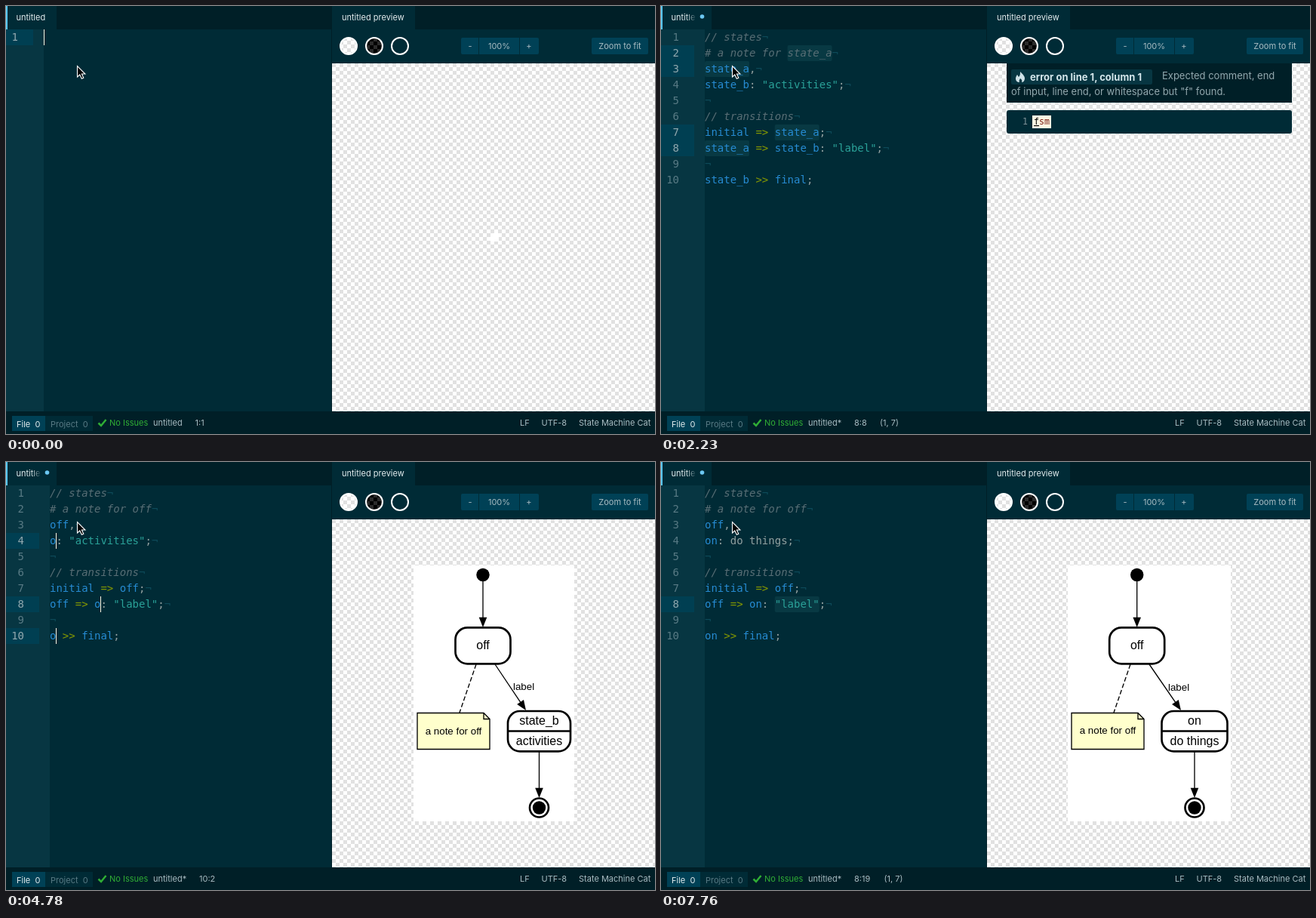
Animation, 860 px wide and 567 px high, one loop 8000 ms. Source, as an HTML page:

```html
<!DOCTYPE html>
<html lang="en">
<head>
<meta charset="utf-8">
<title>Editor with live preview</title>
<style>
  html, body { margin: 0; width: 860px; height: 567px; overflow: hidden; background: #002b36; }
  svg { display: block; }
  text { white-space: pre; font: 11px Inter, sans-serif; fill: #a9bcc2; }
  .code, .code text { font: 14px "DejaVu Sans Mono", monospace; fill: #93a1a1; }
  .code .comment { fill: #586e75; font-style: italic; }
  .code .id { fill: #268bd2; }
  .code .op { fill: #859900; }
  .code .str { fill: #2aa198; }
  .code .eol { fill: #0d4a59; }
  .code .num { fill: #587a84; text-anchor: end; }
  .code .on { fill: #93a9af; }
  .tab { fill: #e3ecee; }
  .mid { text-anchor: middle; }
  .popup { font: 12.6px "DejaVu Sans Mono", monospace; fill: #7fa3ae; }
  .match { font: bold 13.3px "DejaVu Sans Mono", monospace; fill: #d3e3e8; }
  .match tspan { fill: #fff; }
  .error { font-size: 13px; fill: #93a8ae; }
  .strong { font-weight: 700; fill: #d5e7ec; }
  .excerpt { font: 11.6px "DejaVu Sans Mono", monospace; fill: #7d9197; }
  .bad { fill: #7a1a10; }
  .bad tspan { fill: #000; text-decoration: underline; }
  .diagram { fill: none; stroke: #000; stroke-width: 1.33; }
  .diagram text { font: 16px "Liberation Sans", Arial, sans-serif; fill: #000; stroke: none; }
  .diagram .small { font-size: 13.33px; }
  .solid { fill: #000; stroke: none; }
  .thick { stroke-width: 2.67; }
</style>
</head>
<body>
<svg width="860" height="567">
  <defs>
    <pattern id="light" x="432" y="76" width="10" height="10" patternUnits="userSpaceOnUse">
      <path fill="#fff" d="M0 0h10v10H0z"/><path fill="#e1e1e1" d="M0 0h5v5H0zM5 5h5v5H5z"/>
    </pattern>
    <pattern id="dark" x="482" y="47" width="10" height="10" patternUnits="userSpaceOnUse">
      <path fill="#000" d="M0 0h10v10H0z"/><path fill="#2b2b2b" d="M0 0h5v5H0zM5 5h5v5H5z"/>
    </pattern>
    <linearGradient id="fade">
      <stop stop-color="#002b36" stop-opacity="0"/><stop offset="1" stop-color="#002b36"/>
    </linearGradient>
  </defs>

  <path fill="#002b36" d="M0 0h860v567H0z"/>
  <path fill="#001f27" d="M67 0h365v31H67zM542 0h318v31H542zM0 537h860v30H0zM431 31h1v506h-1z"/>
  <path fill="#5ac8fa" d="M0 0h2v31H0z"/>
  <text class="tab" x="445" y="19">untitled preview</text>

  <path fill="url(#light)" d="M432 76h428v461H432z"/>
  <g stroke="#fff" stroke-width="2">
    <circle cx="454" cy="53" r="11" fill="url(#light)"/>
    <circle cx="488" cy="53" r="11" fill="url(#dark)"/>
    <circle cx="522" cy="53" r="11" fill="none"/>
  </g>
  <g fill="#004156">
    <rect x="603" y="42" width="103" height="22" rx="2"/>
    <rect x="776" y="42" width="75" height="22" rx="2"/>
    <path d="M8 543h44v20H8z"/>
  </g>
  <path fill="#002b36" d="M626 42h1v22h-1zM680 42h1v22h-1zM52 543h63v20H52z"/>
  <g class="mid">
    <text x="615" y="57">-</text><text x="653.5" y="57">100%</text>
    <text x="693" y="57">+</text><text x="813.5" y="57">Zoom to fit</text>
  </g>

  <text class="tab" x="14" y="558">File  0</text>
  <text x="59" y="558" style="fill:#587a84">Project  0</text>
  <path d="M122.500 552.500l3.500 3.500 6.500-8" fill="none" stroke="#2fae35" stroke-width="2.500"/>
  <text x="137" y="556" style="fill:#2fae35">No Issues</text>
  <text x="681" y="556">LF</text><text x="709.500" y="556">UTF-8</text>
  <text x="759" y="556">State Machine Cat</text>

  <g id="view"></g>
  <path d="M94.500 79.500v14.500l3.300-3 2.500 5.300 2.500-1.100-2.400-5.200h4.500z" fill="#000" stroke="#fff" stroke-width="1.100"/>
</svg>
<script>
const LOOP = 8000, CHAR = 8.43, ROW = 21, TOP = 31;

// Preview geometry: page, state, note, second state, label, edges
const wide = { page: [525, 768], sx: 636, note: [530, 656], bx: 721.5, half: 41.5, label: 681, dash: [626, 602], edge: [656, 701], drop: 0 };
const slim = { page: [540, 753], sx: 632, note: [545, 641], bx: 706.5, half: 41.5, label: 672, dash: [623, 601], edge: [648, 689], drop: 0 };
const last = { page: [539, 755], sx: 630.7, note: [544, 640], bx: 707, half: 43.5, label: 672, dash: [622, 600], edge: [647, 689], drop: 1 };

// Each step changes part of the state from its time on
const steps = [
  [0, { typed: "", caret: true }],
  [300, { caret: false }],
  [740, { typed: "f", caret: true }],
  [890, { typed: "fs", popup: true }],
  [1190, { dirty: true, error: "f" }],
  [1330, { typed: "fsm" }],
  [1480, { error: "fs" }],
  [1630, { error: "fsm" }],
  [1930, { caret: false }],
  [2230, { expanded: true, popup: false, a: "state_a", b: "state_b", act: '"activities"', label: '"label"', focus: "a", selected: true }],
  [2680, { error: "", shown: ["state_a", "state_b", "activities", wide] }],
  [3580, { a: "of", selected: false, caret: true }],
  [3730, { a: "off" }],
  [4030, { shown: ["off", "state_b", "activities", slim] }],
  [4180, { focus: "b", selected: true }],
  [4780, { b: "o", selected: false }],
  [4930, { b: "on" }],
  [5230, { shown: ["off", "on", "activities", slim], focus: "act", selected: true }],
  [5830, { act: "d", selected: false }],
  [5980, { act: "do" }],
  ...["do ", "do th", "do thi", "do thin", "do thing", "do things"].map((act, i) => [6280 + 148 * i, { act }]),
  [7470, { caret: false, shown: ["off", "on", "do things", last] }],
  [7760, { focus: "label", selected: true }]
];

const text = (x, y, s, cls = "") => `<text x="${x}" y="${y}" class="${cls}">${s}</text>`;
const box = (x, y, w, h, fill, rx = 0) => `<rect x="${x}" y="${y}" width="${w}" height="${h}" fill="${fill}" rx="${rx}"/>`;

// Tokens are [text, class, slot]
function codeLines(s) {
  if (!s.expanded) return [[[s.typed, "id", "typed"]]];
  const a = [s.a, "id", "a"], b = [s.b, "id", "b"];
  const act = [s.act, s.act[0] == '"' ? "str" : "", "act"];
  const comment = t => [t, "comment"], op = t => [t, "op"];
  return [
    [comment("// states")],
    [comment("# a note for "), [s.a, "comment", "a"]],
    [a, [","]],
    [b, [": "], act, [";"]],
    [],
    [comment("// transitions")],
    [["initial", "id"], op(" => "), a, [";"]],
    [a, op(" => "), b, [": "], [s.label, "str", "label"], [";"]],
    [],
    [b, op(" >> "), ["final", "id"], [";"]]
  ];
}

function editor(s) {
  const left = s.expanded ? 58 : 50, focus = s.focus || "typed";
  const lines = codeLines(s);
  let out = box(0, TOP, left, 537 - TOP, "#073642"), marks = "", carets = "", pos, count = 0;
  lines.forEach((tokens, row) => {
    const y = TOP + row * ROW;
    let col = 0, active = false, line = "";
    for (const [str, cls, slot] of tokens) {
      const x = left + col * CHAR;
      line += text(x, y + 15, str, cls);
      col += str.length;
      if (slot != focus) continue;
      active = true;
      pos = `${row + 1}:${col + 1}`;
      count = str.length;
      if (s.selected) marks += box(x, y, count * CHAR, ROW, "#083943", 2);
      else if (s.caret) carets += box(Math.floor(left + col * CHAR), y, 1, ROW, "#fdf6e3");
    }
    if (active) out += box(0, y, left - 14, ROW, "#003f52");
    line += text(left - 34, y + 15, row + 1, active ? "num on" : "num");
    if (row < lines.length - 1) line += text(left + col * CHAR, y + 15, "¬", "eol");
    marks += line;
  });
  const x = s.dirty ? 256 : 250.5;
  return out + `<g class="code">${marks}</g>` + carets +
    text(195, 556, s.dirty ? "untitled*" : "untitled") + text(x, 556, pos) +
    (s.selected ? text(290 + 5.5 * (pos.length - 3), 556, `(1, ${count})`) : "");
}

function tab(s) {
  return text(13.5, 19, s.dirty ? "untitle" : "untitled", "tab") +
    (s.dirty ? box(34, 5, 13, 20, "url(#fade)") + '<circle cx="54.500" cy="14" r="2.800" fill="#6cc8f2"/>' : "");
}

function popup(s) {
  const n = s.typed.length;
  return box(12, 52, 201, 28, "#00485f", 3) + box(12, 52, 28, 28, "#20594b", 3) +
    '<path d="M19 66.500h8M25 63l4 3.500-4 3.500zM32.500 62v9" stroke="#8a9f00" stroke-width="2" fill="#8a9f00"/>' +
    text(51, 71, `<tspan>${"fsm".slice(0, n)}</tspan>${"fsm".slice(n)}`, "match") +
    text(88, 70, "smcat skeleton", "popup");
}

function errorView(found) {
  return box(458, 76, 378, 52, "#001f27") + box(464, 84, 187, 20, "#073642", 2) +
    '<path d="M476 87c4 4 6 6 6 9s-2 5-4 5c1-2 0-4-2-5-1 2-2 3-1 5-3 0-5-2-5-5 0-2 1-3 2-5 1 1 1 2 2 3 2-2 2-4 2-7z" fill="#cfe2e8"/>' +
    text(489, 99, "error on line 1, column 1", "error strong") +
    text(664, 97, "Expected comment, end", "error") +
    text(464, 118, 'of input, line end, or whitespace but "f" found.', "error") +
    box(458, 138, 378, 31, "#002b36", 3) + text(479, 157, "1", "excerpt") +
    box(492, 145, 4 + 7 * found.length, 17, "#fdf6e3") +
    text(494, 157, `<tspan>f</tspan>${found.slice(1)}`, "excerpt bad");
}

function arrow(x1, y1, x2, y2) {
  const dx = x2 - x1, dy = y2 - y1, turn = Math.atan2(dy, dx) * 180 / Math.PI;
  return `<g transform="translate(${x2} ${y2}) rotate(${turn})"><path d="M${-Math.hypot(dx, dy)} 0H-12"/>` +
    '<path class="solid" d="M0 0l-13.300-5.300v10.600z"/></g>';
}

function diagram([a, b, act, g]) {
  const { sx, bx, half, drop } = g, [n0, n1] = g.note;
  const rounded = (x, y, w, h) => `<rect class="thick" x="${x}" y="${y}" width="${w}" height="${h}" rx="16"/>`;
  return `<g class="diagram"><path d="M${g.page[0]} 137H${g.page[1]}V476H${g.page[0]}z" fill="#fff" stroke="none"/>` +
    `<circle class="solid" cx="${sx}" cy="149.500" r="8.700"/>` + arrow(sx, 158, sx, 219) +
    rounded(sx - 36.5, 219.3, 73, 48) + text(sx, 248, a, "mid") +
    `<path d="M${g.dash[0]} 268L${g.dash[1]} 332" stroke-dasharray="6 3"/>` +
    `<path d="M${n0} 332.500H${n1 - 8}l8 8V380.500H${n0}z" fill="#ffc"/><path d="M${n1 - 8} 332.500v8h8"/>` +
    text((n0 + n1) / 2, 361 - drop, `a note for ${a}`, "mid small") +
    arrow(g.edge[0], 268, g.edge[1], 329) + text(g.label, 302 + drop, "label", "small") +
    rounded(bx - half, 330, half * 2, 53.3) + `<path class="thick" d="M${bx - half} 356.500h${half * 2}"/>` +
    text(bx, 348, b, "mid") + text(bx, 375, act, "mid") + arrow(bx, 384, bx, 445) +
    `<circle class="thick" cx="${bx}" cy="458" r="12.500"/><circle class="solid" cx="${bx}" cy="458" r="8.700"/></g>`;
}

function preview(s) {
  if (s.error) return errorView(s.error);
  return s.shown ? diagram(s.shown) : box(642, 301, 11, 11, "#fff");
}

const view = document.getElementById("view");
let drawn = 0;

function frame(now) {
  const t = now % LOOP;
  const past = steps.filter(([at]) => at <= t);
  if (past.length != drawn) {
    drawn = past.length;
    const s = Object.assign({}, ...past.map(([, change]) => change));
    view.innerHTML = tab(s) + editor(s) + preview(s) + (s.popup ? popup(s) : "");
  }
  requestAnimationFrame(frame);
}
frame(0);
</script>
</body>
</html>
```
